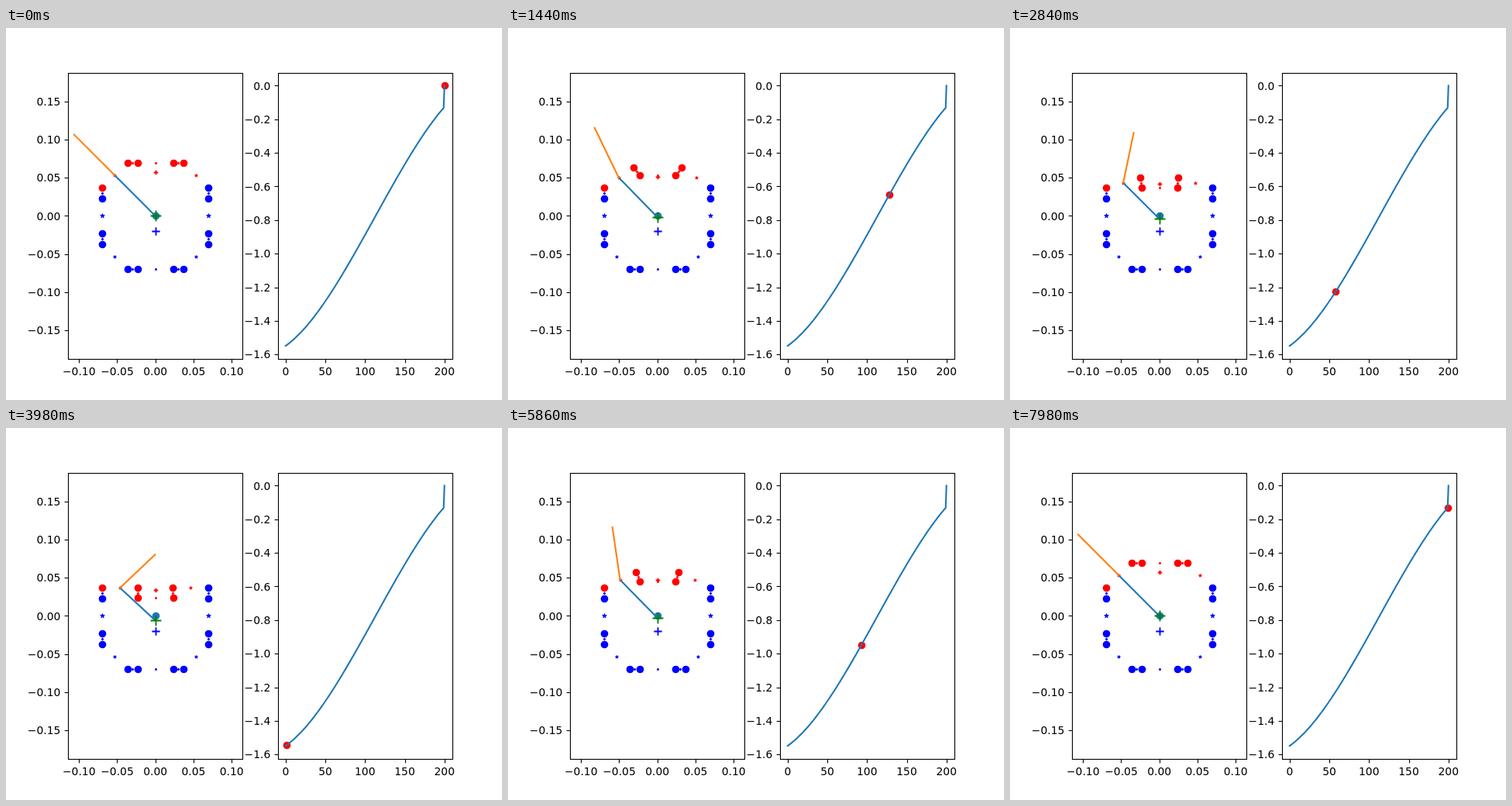
Write an HTML page that moves like this. It is 640x480 px and loops after 8000 ms.

```html
<!DOCTYPE html>
<html lang="en">
<head>
<meta charset="utf-8">
<title>Folding linkage</title>
<style>
  html, body { margin: 0; width: 100%; height: 100%; overflow: hidden; background: #fff; }
  svg { display: block; width: 640px; height: 480px; }
  text { font: 13.89px "DejaVu Sans", sans-serif; }
  .axis { fill: none; stroke: #000; stroke-width: 1.11; }
  .line { fill: none; stroke-width: 2.08; stroke-linecap: square; stroke-linejoin: round; }
</style>
</head>
<body>
<svg id="stage" viewBox="0 0 640 480"></svg>
<script>
const RED = '#f00', BLUE = '#00f', GREEN = '#008000', TEAL = '#1f77b4', ORANGE = '#ff7f0e';
const stage = document.getElementById('stage');

function add(tag, attrs, text) {
  const el = document.createElementNS('http://www.w3.org/2000/svg', tag);
  for (const key in attrs) el.setAttribute(key, attrs[key]);
  if (text) el.textContent = text;
  stage.appendChild(el);
  return el;
}

const snap = v => Math.floor(v + 0.5) + 0.5;

// Left plot: offsets in pixels from the body centre, y up.
const CX = 192.72, CY = 242.4, UNIT = 985;
const INNER = 22.9, OUTER = 36.1, HALF = 68.7;
const LINK = OUTER - INNER, PLATE = (HALF - OUTER) * Math.SQRT2;
const MID = (INNER + OUTER) / 2, CORNER = (HALF + OUTER) / 2;

// Right plot
const X0 = 360.8, Y0 = 74.4, STEP_X = 204.95 / 200, STEP_Y = 216.75;

function label(v, digits) {
  return (v < 0 ? '\u2212' : '') + Math.abs(v).toFixed(digits);
}

function xTick(x, text) {
  add('path', { class: 'axis', d: `M${snap(x)} 427.5v4.9` });
  add('text', { x, y: 448, 'text-anchor': 'middle' }, text);
}

function yTick(edge, y, text) {
  add('path', { class: 'axis', d: `M${edge} ${snap(y)}h-4.9` });
  add('text', { x: edge - 10.2, y: y + 5.2, 'text-anchor': 'end' }, text);
}

function marker(d, color, width, filled) {
  return add('path', { d, stroke: color, 'stroke-width': width, fill: filled ? color : 'none' });
}

function dot(color, r = 4.85) {
  return add('circle', { r, fill: color });
}

function plus(color, span, width = 1.8) {
  const h = span / 2;
  return marker(`M${-h} 0H${h}M0 ${-h}V${h}`, color, width);
}

function star(color, r) {
  const points = Array.from({ length: 10 }, (_, n) => {
    const a = n * Math.PI / 5, q = n % 2 ? r * 0.38 : r;
    return `${(q * Math.sin(a)).toFixed(2)} ${(-q * Math.cos(a)).toFixed(2)}`;
  });
  return marker(`M${points.join('L')}Z`, color, 1, true);
}

const joint = color => plus(color, 3.4, 1.5);

function place(el, x, y) {
  el.setAttribute('transform', `translate(${snap(x)} ${snap(y)})`);
}
const put = (el, x, y) => place(el, CX + x, CY - y);

function segment(el, a, b) {
  el.setAttribute('d', `M${CX + a[0]} ${CY - a[1]}L${CX + b[0]} ${CY - b[1]}`);
}

// Hinge angle against step; the last step jumps to zero.
function angle(i) {
  if (i === 200) return 0;
  const a = i - 1, b = i - 58, c = i - 128;
  return -1.5455 + a * (0.005605 + b * (2.066e-5 - c * 1.378e-7));
}

// Ticks and labels
for (let n = -2; n <= 2; n++) xTick(CX + n * 0.05 * UNIT, label(n * 0.05, 2));
for (let n = -3; n <= 3; n++) yTick(80.5, CY - n * 0.05 * UNIT, label(n * 0.05, 2));
for (let n = 0; n <= 4; n++) xTick(X0 + n * 50 * STEP_X, String(n * 50));
for (let n = 0; n <= 8; n++) yTick(351.5, Y0 + n * 0.2 * STEP_Y, label(-n * 0.2, 1));

// Fixed parts of the body
put(dot(TEAL), 0, 0);
for (const s of [-1, 1]) {
  for (const y of [OUTER, INNER, -INNER, -OUTER])
    put(dot(s < 0 && y === OUTER ? RED : BLUE), s * HALF, y);
  for (const x of [INNER, OUTER]) put(dot(BLUE), s * x, -HALF);
  put(joint(BLUE), s * HALF, MID);
  put(joint(BLUE), s * HALF, -MID);
  put(joint(BLUE), s * MID, -HALF);
  put(star(BLUE, 2.9), s * HALF, 0);
  put(star(BLUE, 2), s * CORNER, -CORNER);
}
put(star(BLUE, 1.4), 0, -HALF);
put(plus(BLUE, 10.3), 0, -19.77);

// Moving parts
const sides = [-1, 1].map(s => ({
  s, inner: dot(RED), outer: dot(RED), joint: joint(RED), corner: star(RED, 2)
}));
const top_ = star(RED, 1.4);
const redMass = plus(RED, 5.6);
const arm = add('path', { class: 'line', stroke: TEAL });
const ray = add('path', { class: 'line', stroke: ORANGE });
const mass = plus(GREEN, 13.9);
const cursor = dot(RED);

const curve = Array.from({ length: 201 }, (_, i) =>
  `${(X0 + i * STEP_X).toFixed(2)} ${(Y0 - angle(i) * STEP_Y).toFixed(2)}`);
add('path', { class: 'line', stroke: TEAL, d: 'M' + curve.join('L') });

for (const x of [80.5, 351.5])
  add('rect', { class: 'axis', x, y: 58.5, width: 225, height: 369 });

function pose(i) {
  const y = INNER + (HALF - INNER) * i / 200;

  // Outer hinge: where the corner plate and the short link meet
  const dx = HALF - INNER, dy = y - OUTER, d = Math.hypot(dx, dy);
  const cos = (d * d + PLATE * PLATE - LINK * LINK) / (2 * d * PLATE);
  const tilt = Math.atan2(dy, dx) + Math.acos(Math.min(1, cos));
  const ux = Math.cos(tilt), uy = Math.sin(tilt);
  const bx = HALF - PLATE * ux, by = OUTER + PLATE * uy;
  const kx = (HALF + bx) / 2, ky = (OUTER + by) / 2;

  for (const p of sides) {
    put(p.inner, p.s * INNER, y);
    put(p.outer, p.s * bx, by);
    put(p.joint, p.s * (INNER + bx) / 2, (y + by) / 2);
    put(p.corner, p.s * kx, ky);
  }
  put(top_, 0, y);

  const ry = 0.745 * ky + 0.155 * y + 0.1 * (y + by) / 2;
  const gy = 0.259 * ry - 0.741 * 19.77;
  put(redMass, 0, ry);
  put(mass, 0, gy);

  // Mirror the centre of mass in the left corner plate
  const along = HALF * ux + (gy - OUTER) * uy;
  const tip = [2 * (along * ux - HALF), 2 * (OUTER + along * uy) - gy];
  segment(arm, [0, gy], [-kx, ky]);
  segment(ray, [-kx, ky], tip);

  place(cursor, X0 + i * STEP_X, Y0 - angle(i) * STEP_Y);
}

const start = performance.now();
function frame() {
  const t = Math.max(0, performance.now() - start);
  pose(Math.abs(200 - Math.floor(t / 20) % 400));
  requestAnimationFrame(frame);
}
pose(200);
requestAnimationFrame(frame);
</script>
</body>
</html>
```
